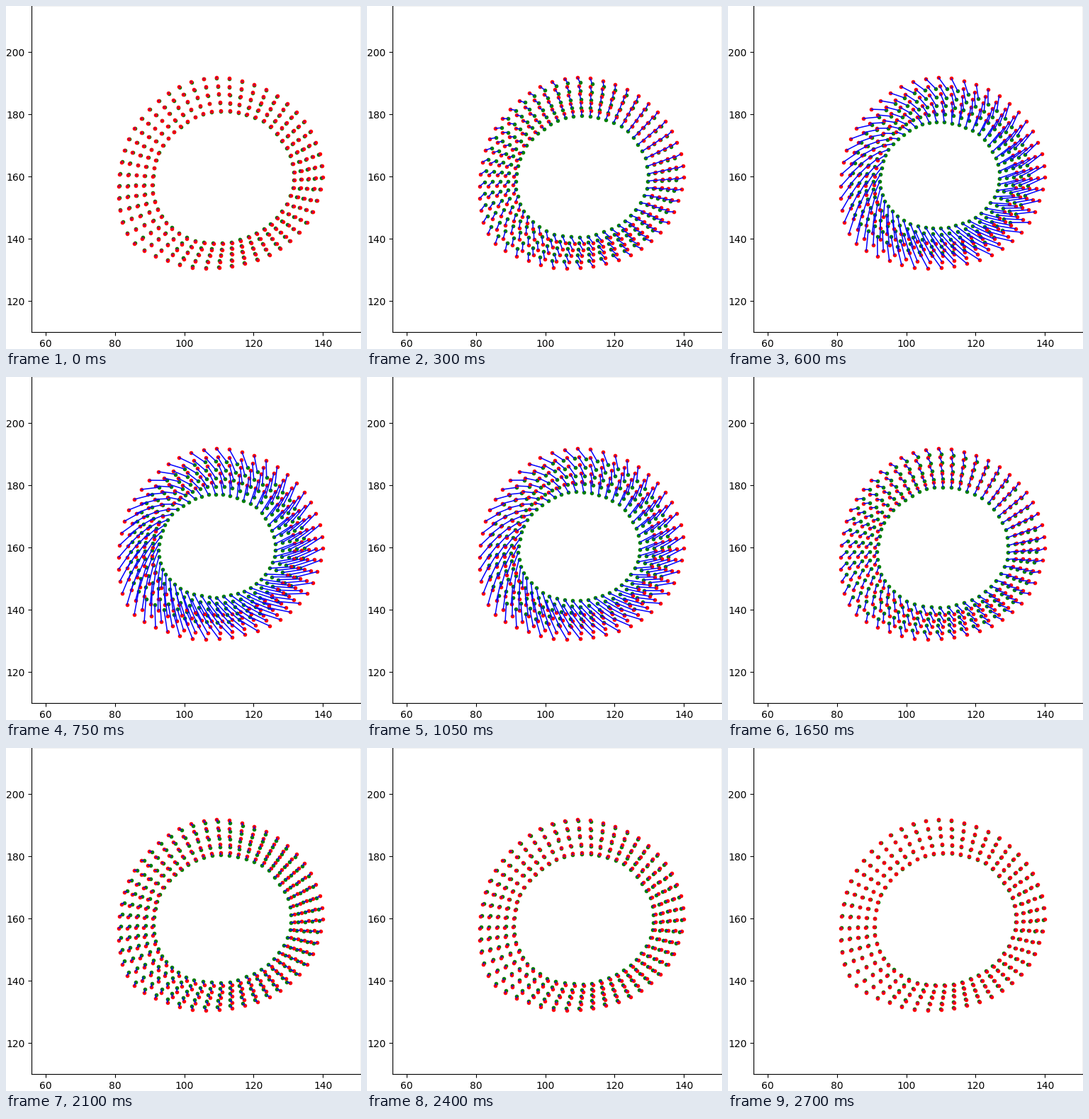
Write a matplotlib script that moves like this. It is 501x485 px and loops after 2.85 s.

```python
import numpy as np
import matplotlib.pyplot as plt
from matplotlib.animation import FuncAnimation
from matplotlib.collections import LineCollection

WIDTH, HEIGHT, DPI = 501, 485, 100
LEFT, BOTTOM, AX_W, AX_H = 36.2, 23.7, 465, 462
X_LIM, Y_LIM = (56, 151), (110, 215)
SPOKES, RINGS = 50, 5
FRAMES, INTERVAL = 19, 150

# Wall contours in stage pixels, clockwise from the top.
OUTER = [(297, 101), (333, 106), (367, 118), (397, 138), (421, 163),
         (437, 193), (446, 226), (444, 259), (433, 291), (414, 320),
         (387, 343), (355, 359), (319, 368), (282, 371), (245, 366),
         (211, 354), (181, 336), (164, 306), (159, 272), (160, 238),
         (167, 204), (181, 173), (202, 146), (229, 123), (261, 107)]
INNER = [(303, 148), (328, 150), (352, 157), (374, 170), (390, 190),
         (402, 211), (407, 235), (406, 257), (397, 280), (383, 300),
         (365, 316), (343, 327), (319, 335), (293, 336), (267, 333),
         (244, 322), (226, 307), (214, 288), (207, 265), (207, 241),
         (211, 218), (221, 197), (237, 178), (256, 163), (278, 152)]

# Share of the full contraction and of the full twist in each frame.
SQUEEZE = [.05, .17, .38, .66, .88, 1, .93, .8, .69, .59,
           .5, .42, .33, .25, .18, .13, .10, .07, .045]
TWIST = [.03, .11, .26, .55, .83, 1, .96, .83, .68, .54,
         .42, .32, .24, .18, .13, .09, .07, .05, .03]
ROTATION = 0.118


def resample(points, count):
    """Closed smooth curve through the points, as complex numbers."""
    pts = np.array(points) @ [1, 1j]
    spectrum = np.fft.fftshift(np.fft.fft(pts))
    before = count // 2 - len(pts) // 2
    padded = np.pad(spectrum, (before, count - len(pts) - before))
    return np.fft.ifft(np.fft.ifftshift(padded)) * count / len(pts)


def to_data(z):
    x = X_LIM[0] + (z.real - LEFT) * (X_LIM[1] - X_LIM[0]) / AX_W
    y = Y_LIM[0] + (HEIGHT - BOTTOM - z.imag) * (Y_LIM[1] - Y_LIM[0]) / AX_H
    return x, y


def blend(outer, inner):
    return outer + (inner - outer) * depth


depth = np.linspace(0, 1, RINGS)[:, None]
rest = blend(resample(OUTER, SPOKES), resample(INNER, SPOKES))
offset = rest - blend(303 + 236j, 307 + 242.5j)
squeeze_move = (blend(-2.5 - 2.2j, -8.75 - 3.2j)
                - blend(.167, .195) * offset.real
                - 1j * blend(.16, .233) * offset.imag)
twist_move = 1j * ROTATION * offset

# The small margin keeps the pixel size from rounding down.
fig = plt.figure(figsize=((WIDTH + .01) / DPI, (HEIGHT + .01) / DPI), dpi=DPI)
ax = fig.add_axes([LEFT / WIDTH, BOTTOM / HEIGHT, AX_W / WIDTH, AX_H / HEIGHT])
ax.set(xlim=X_LIM, ylim=Y_LIM,
       xticks=range(60, 141, 20), yticks=range(120, 201, 20))

start = np.column_stack(to_data(rest.ravel()))
moved_dots, = ax.plot([], [], ".", color="green", ms=6, zorder=2)
ax.plot(*start.T, ".", color="red", ms=6, zorder=3)
arrows = LineCollection([], colors="blue", linewidths=1.1,
                        capstyle="butt", zorder=4)
ax.add_collection(arrows, autolim=False)


def update(i):
    moved = rest + SQUEEZE[i] * squeeze_move + TWIST[i] * twist_move
    end = np.column_stack(to_data(moved.ravel()))
    moved_dots.set_data(*end.T)
    arrows.set_segments(np.stack([start, end], axis=1))
    return moved_dots, arrows


anim = FuncAnimation(fig, update, frames=FRAMES, interval=INTERVAL,
                     repeat=True, repeat_delay=0)
plt.show()
```
